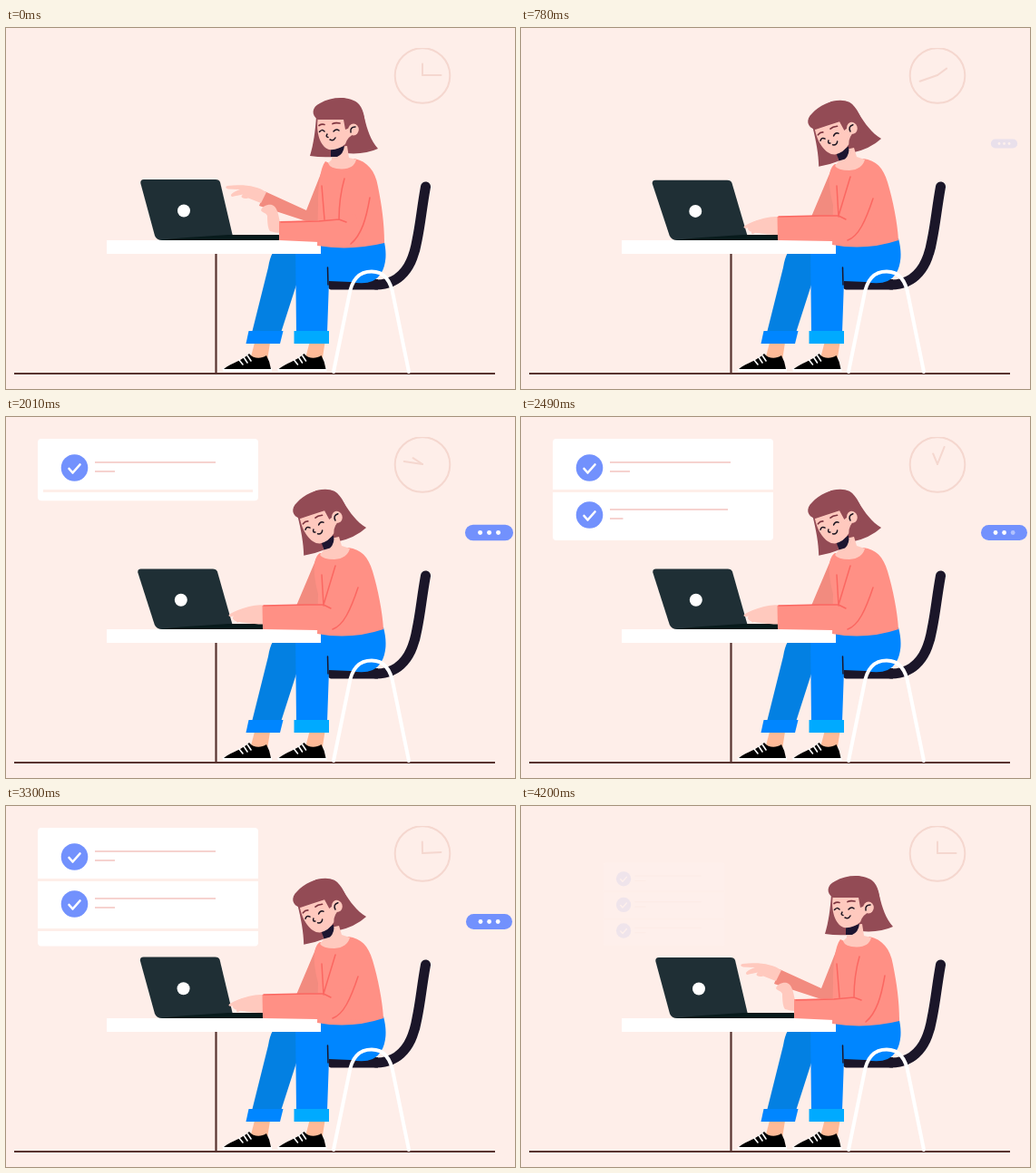
Write an HTML page that moves like this. It is 561 px wide and 398 px high and loops after 4500 ms.

```html
<!DOCTYPE html>
<html lang="en">
<head>
<meta charset="utf-8">
<title>Working at the desk</title>
<style>
  html, body { margin: 0; width: 100%; height: 100%; overflow: hidden; background: #feeee9; }
  svg { display: block; width: 100%; height: 100%; }
  .line { fill: none; stroke-linecap: round; stroke-linejoin: round; }
  .skin { fill: #ffc9be; }
  .hair { fill: #934b55; }
  .knit { fill: #ff9085; }
  .seam { stroke: #fb6761; stroke-width: 1.5; }
  .ink { stroke: #1b1420; stroke-width: 1.5; }
  .brow { stroke: #7d3540; stroke-width: 1.7; }
  .faint { stroke: #f5d7cf; stroke-width: 2; }
  .rule { stroke: #f6d2cf; stroke-width: 2; fill: none; }
  .gap { stroke: #feeee9; stroke-width: 3.2; }
  .tick { stroke: #fff; stroke-width: 2.6; }
  .blue { fill: #7291fd; }
</style>
</head>
<body>
<svg viewBox="0 0 561 398" preserveAspectRatio="none">
  <defs>
    <g id="shoe">
      <path fill="#ffba97" d="M274 347H291L288 366H269Z"/>
      <path fill="#fff" d="M239 375H293V379H241Q238 378 239 375Z"/>
      <path d="M240 376C247 370 260 367 268 359C273 365 281 365 287 361Q291 368 292 376Z"/>
      <path class="line" stroke="#fff" stroke-width="1.6" d="M257 366L261 371M262 363L266 369M266 361L270 367"/>
    </g>
  </defs>

  <g class="line faint">
    <circle cx="459" cy="52.5" r="30.3"/>
    <path id="longHand" d="M459 52V31.5"/>
    <path id="shortHand" d="M459 52V39.5"/>
  </g>
  <path fill="#feeee9" d="M440 18H478V22H440Z"/>

  <g id="list">
    <rect id="card" x="35" width="243" rx="4" fill="#fff"/>
  </g>

  <g id="bubble">
    <rect class="blue" x="507" y="119" width="51" height="17" rx="8.5"/>
    <g fill="#fff">
      <circle class="dot" cx="523" cy="127.5" r="2.4"/>
      <circle class="dot" cx="532.6" cy="127.5" r="2.4"/>
      <circle class="dot" cx="542.2" cy="127.5" r="2.4"/>
    </g>
  </g>

  <path class="line" stroke="#1b1629" stroke-width="11" d="M462.5 175C458 200 457 215 453 234C448 264 434 283 408 283"/>
  <path fill="#1b1629" d="M355 277H410V288.5H358Q355 288 355 284Z"/>

  <path stroke="#57332f" stroke-width="2.2" d="M9 381H539M231.5 249V381"/>
  <use href="#shoe"/>
  <use href="#shoe" x="60.5"/>
  <path fill="#0380e2" d="M292 246H323L321 280L303 336H271L289 264Q291 252 294 248Z"/>
  <path fill="#0086ff" d="M319 238L416 232C422 254 417 273 404 279Q395 283 380 280L356 279L354 336H320Z"/>
  <path fill="#0086ff" d="M267.500 334H305.500L302 348H264.500Z"/>
  <path fill="#00aaff" d="M317.500 334H356V348H317.500Z"/>
  <path class="line" stroke="#1b1629" stroke-width="1.5" d="M354.500 264L355 283"/>
  <path class="line" stroke="#fff" stroke-width="4" stroke-linecap="butt" d="M361 379L378 296C381 277 389 268.500 403 268.500C416 268.500 424 277 427 296L444 379"/>

  <path id="lid" fill="#1f2f35" d="M152 167H231Q235 167 236 170L251 234H172Q166 234 164 229L148.300 171Q148 167 152 167Z"/>
  <circle id="badge" cx="196" cy="201.500" r="7" fill="#fff"/>
  <path fill="#071a1b" d="M170 234Q178 232 245 228H300Q303 228 303 231T300 234Z"/>
  <rect x="111" y="234" width="236" height="15" fill="#fff"/>

  <path id="backArm" fill="#f28b7f"/>
  <path id="backHand" class="skin" d="M287 181C277 174 262 172 244 174Q240 176 245 177.500L258 178C250 181 246 184 249 186L261 183.500C257 187 262 189 267 187.500L281 193Z"/>
  <path id="torso" class="knit"/>
  <path id="hairBack" class="hair" d="M342 97C341 113 339 128 335 141Q348 143 362 142L374 138Q395 140 410 133C402 124 398 112 395 99Q391 80 370 77Z"/>
  <path id="neck" class="skin"/>
  <g id="head">
    <path fill="#1d1530" d="M358 134L373 130Q372 139 365 142H358Z"/>
    <path class="skin" d="M344 98H385V116Q376 120 374 128Q366 135 356 134C346 131 341 114 344 98Z"/>
    <path class="hair" d="M344 101C336 96 337 87 346 83C360 75 380 75 389 84C396 92 395 104 397 115L388 122L384 108L374 112L372 101Q358 101 344 101Z"/>
    <ellipse class="skin" cx="383" cy="112" rx="5.800" ry="6.500"/>
    <path class="line ink" d="M380 115Q379 109 385 109"/>
    <path class="line brow" d="M345 107.500Q348 105.500 351 106.500M360 105.500Q363 104 368 105"/>
    <path class="line ink" d="M345.500 114.500Q348 111 351 114M361 114Q364 110.500 367 113M354 117Q352 120 355 120.500M357 123Q361 125 363 121"/>
  </g>
  <path id="frontHand" class="skin"/>
  <path id="sleeve" class="knit"/>
  <path id="seams" class="line seam"/>
</svg>

<script>
const LOOP = 4500, STEP = 30, LAST = 4200;
const $ = id => document.getElementById(id);
const set = (el, attrs) => { for (const k in attrs) el.setAttribute(k, attrs[k]); };
const clamp = x => Math.min(1, Math.max(0, x));
const span = (t, start, length) => clamp((t - start) / length);
const smooth = x => x * x * (3 - 2 * x);
const easeOut = x => 1 - (1 - x) ** 3;
const wave = (t, period) => Math.cos(2 * Math.PI * t / period);

// Each pair: pointing pose, typing pose
const poses = {
  backArm: ["M348 158L331 201L285 180L279 196L331 213L346 214Z",
            "M342 156L320 208L284 209L284 222L325 226L346 215Z"],
  torso: ["M352 147C346 155 344 175 344 195L343 240Q380 246 417 237C417 215 414 195 410 175C407 157 398 147 384 144Q369 156 352 147Z",
          "M346 150C337 156 339 175 344 195L343 239Q380 246 416 234C415 215 410 190 404 170C399 154 392 146 377 144Q364 158 346 150Z"],
  neck: ["M359 132L376 130L378 143L386 145Q384 155 370 155.5Q357 155 355 149L359 145Z",
         "M349 136L367 132L370 142L379 145Q376 156 362 157Q349 157 346 152L350 147Z"],
  frontHand: ["M302 214C300 205 299 197 293 195C288 194 282 197 281 201C283 204 286 203 288 207C288 216 289 222 291 224Q297 226 303 226Z",
              "M285 214C275 211 264 210 258 213C252 215 250 219 250 222C252 225 256 225 260 226C268 227 276 228 280 228Q283 228 285 228Z"],
  sleeve: ["M301 213L345 212L385 205L395 238L345 236L301 234Z",
           "M282.5 208L340 207L385 200L395 236L343 235L283 234Z"],
  seams: ["M303 214L345 213L367 211L375 214M348 174L351 211M373 166Q367 187 367 211M401 187C397 210 392 228 380 238",
          "M284 208L330 207L350 207L358 211M348 174L350 208M363 164Q356 187 350 207M388 188C380 212 372 230 360 234"]
};
const blend = ([a, b], k) => {
  const to = b.match(/[\d.]+/g);
  let i = 0;
  return a.replace(/[\d.]+/g, n => (+n + (to[i++] - n) * k).toFixed(2));
};

function bezier(x, x1, x2) {
  let lo = 0, hi = 1, u = 0.5;
  for (let i = 0; i < 24; i++) {
    u = (lo + hi) / 2;
    const v = 3 * (1 - u) ** 2 * u * x1 + 3 * (1 - u) * u * u * x2 + u ** 3;
    if (v < x) lo = u; else hi = u;
  }
  return smooth(u);
}

function add(parent, tag, attrs) {
  const el = document.createElementNS("http://www.w3.org/2000/svg", tag);
  set(el, attrs);
  parent.append(el);
  return el;
}

const rows = [[850, 56, 57], [1900, 108, 55], [3150, 160, 54]].map(([start, y, height], i) => {
  const gap = i ? add($("list"), "path", { class: "gap" }) : null;
  const mark = add($("list"), "g", {});
  add(mark, "circle", { class: "blue", cx: 75.5, cy: y, r: 14.8 });
  add(mark, "path", { class: "line tick", d: `M69.500 ${y + 1}l4 4.500l8 -9` });
  const lines = add($("list"), "path", { class: "rule" });
  return { start, y, height, gap, mark, lines };
});

function drawList(t) {
  const first = smooth(span(t, rows[0].start, 380));
  let bottom = 24;
  for (const { start, y, height, gap, mark, lines } of rows) {
    const q = smooth(span(t, start, 380));
    if (gap) {
      const inset = Math.max(0, (0.34 - q) * 43);
      set(gap, { d: `M${35 + inset} ${bottom + 0.5}H${278 - inset}`, visibility: q > 0 ? "visible" : "hidden" });
    }
    bottom += gap ? height * q : height;
    const pop = easeOut(span(t, start + 340, 180));
    set(mark, { transform: `translate(75.5 ${y}) scale(${pop}) translate(-75.5 ${-y})` });
    const a = 133 * easeOut(span(t, start + 360, 320));
    const b = 22 * easeOut(span(t, start + 500, 300));
    set(lines, { d: `M98 ${y - 6}h${a}M98 ${y + 4}h${b}` });
  }
  const trim = 28.5 * (1 - first);
  set($("card"), { y: 24 + trim, height: Math.max(0, bottom - 24 - 2 * trim) });
  const p = 1 - 0.9 * smooth(span(t, 3930, 270));
  const scale = 0.5 + 0.5 * p;
  set($("list"), {
    opacity: first > 0 ? p : 0,
    transform: `translate(159 110) scale(${scale}) translate(-159 -110)`
  });
}

function drawBubble(t) {
  const p = smooth(span(t, 720, 250)) * (1 - smooth(span(t, 3900, 270)));
  const scale = (0.5 + 0.5 * p) * (1 + 0.04 * Math.max(0, wave(t - 2010, 1000)));
  set($("bubble"), {
    opacity: p,
    transform: `translate(532.500 127.500) scale(${scale}) translate(-532.500 -127.500)`
  });
  document.querySelectorAll(".dot").forEach((dot, i) => {
    const away = Math.abs((t - 1040 - 130 * i + 6600) % 1200 - 600);
    set(dot, { opacity: 0.4 + 0.6 * clamp(away / 120) });
  });
}

function drawPerson(t) {
  const k = smooth(span(t, 60, 620)) * (1 - smooth(span(t, 3480, 600)));
  for (const id in poses) set($(id), { d: blend(poses[id], k) });
  const tilt = `translate(${-10 * k} ${0.5 * k}) rotate(${-18 * k} 372 136.5)`;
  set($("head"), { transform: tilt });
  set($("hairBack"), { transform: tilt });
  const typing = span(t, 640, 80) * (1 - span(t, 3400, 80));
  const tap = 1.1 * typing * wave(t, 240);
  set($("backHand"), { transform: `translate(${5 * k} ${29 * k + tap}) rotate(${-21 * k} 283 188)` });
  set($("frontHand"), { transform: `translate(0 ${-tap / 2})` });
}

function drawLaptop(t) {
  const on = smooth(span(t, 540, 180)) * (1 - smooth(span(t, 3050, 500)));
  const dx = -2 * on * (1 + wave(t - 2250, 1600));
  const rise = on * 1.4 + dx * 0.6;
  set($("lid"), { transform: `translate(0 234) matrix(1 0 ${-dx / 67} ${1 + rise / 67} 0 0) translate(0 -234)` });
  set($("badge"), { transform: `translate(${dx} ${-rise / 2})` });
}

function drawClock(t) {
  const turn = 360 * bezier(span(t, 50, 3500), 0.4, 0.2);
  set($("shortHand"), { transform: `rotate(${turn} 459 52)` });
  set($("longHand"), { transform: `rotate(${90 + 3 * turn} 459 52)` });
}

const begin = performance.now();
function frame() {
  const now = (performance.now() - begin) % LOOP;
  const t = Math.min(LAST, Math.floor(now / STEP) * STEP);
  [drawClock, drawList, drawBubble, drawLaptop, drawPerson].forEach(draw => draw(t));
  requestAnimationFrame(frame);
}
frame();
</script>
</body>
</html>
```
